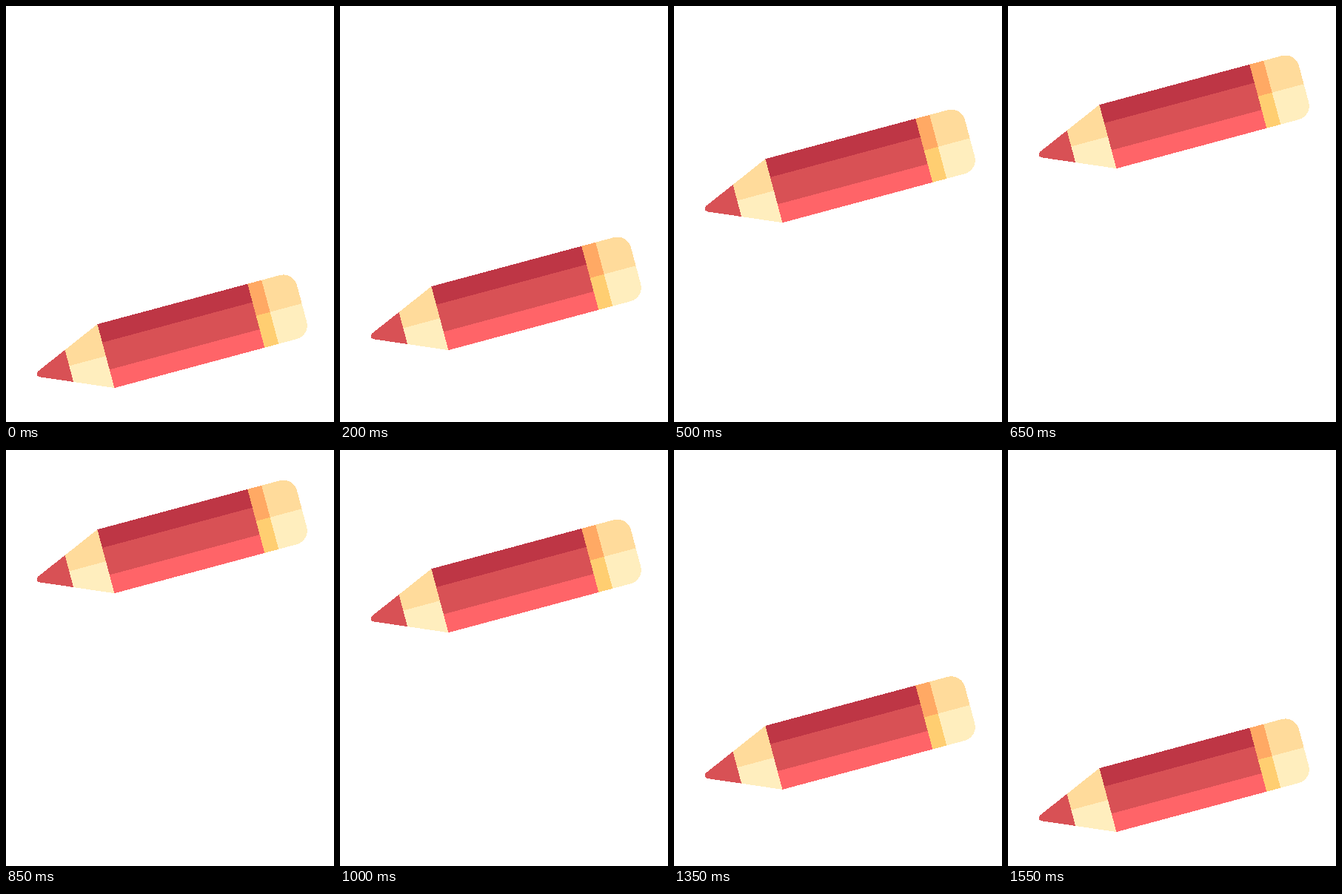
Animation, 443 px wide and 561 px high, one loop 1.6 s. Source, as an HTML page:

```html
<!DOCTYPE html>
<html lang="en">
<head>
<meta charset="utf-8">
<title>Pencil</title>
<style>
  html, body { margin: 0; width: 100%; height: 100%; overflow: hidden; background: #fff; }
  svg { display: block; width: 443px; height: 561px; shape-rendering: crispEdges; }
  .dark { fill: #be3645; }
  .mid { fill: #d85155; }
  .light { fill: #ff6468; }
  .cream { fill: #ffdb9b; }
  .pale { fill: #ffeebe; }
  .orange { fill: #ffa964; }
  .gold { fill: #ffce71; }
</style>
</head>
<body>
<svg viewBox="0 0 443 561">
  <g id="pencil">
    <g transform="translate(123.4 429.1) rotate(-15)">
      <!-- wood and lead -->
      <path class="cream" d="M0 0V44.5H-51.3V22.2Z"/>
      <path class="pale" d="M0 44.5V89L-51.3 66.8V44.5Z"/>
      <path class="mid" d="M-51.3 22.2L-94 40.6C-97.5 42.1 -97.5 46.9 -94 48.4L-51.3 66.8Z"/>
      <!-- body -->
      <path class="dark" d="M0 0H210V25.6H0Z"/>
      <path class="mid" d="M0 25.6H210V63.4H0Z"/>
      <path class="light" d="M0 63.4H210V89H0Z"/>
      <!-- band -->
      <path class="orange" d="M210 0H229.6V44.5H210Z"/>
      <path class="gold" d="M210 44.5H229.6V89H210Z"/>
      <!-- eraser -->
      <path class="cream" d="M229.6 0H255A19 19 0 0 1 274 19V44.5H229.6Z"/>
      <path class="pale" d="M229.6 44.5H274V70A19 19 0 0 1 255 89H229.6Z"/>
    </g>
  </g>
</svg>
<script>
  const LOOP = 1600, STEP = 50, TOP = 800, END = 1550, RISE = 326;
  const pencil = document.getElementById('pencil');
  const smooth = u => u * u * (3 - 2 * u);

  function lift(t) {
    return RISE * (t < TOP ? smooth(t / TOP) : 1 - smooth((t - TOP) / (END - TOP)));
  }

  function draw(now) {
    const t = Math.floor((now % LOOP) / STEP) * STEP;
    pencil.setAttribute('transform', `translate(0 ${-lift(t)})`);
  }

  let start;
  function tick(now) {
    start ??= now;
    draw(now - start);
    requestAnimationFrame(tick);
  }
  draw(0);
  requestAnimationFrame(tick);
</script>
</body>
</html>
```
